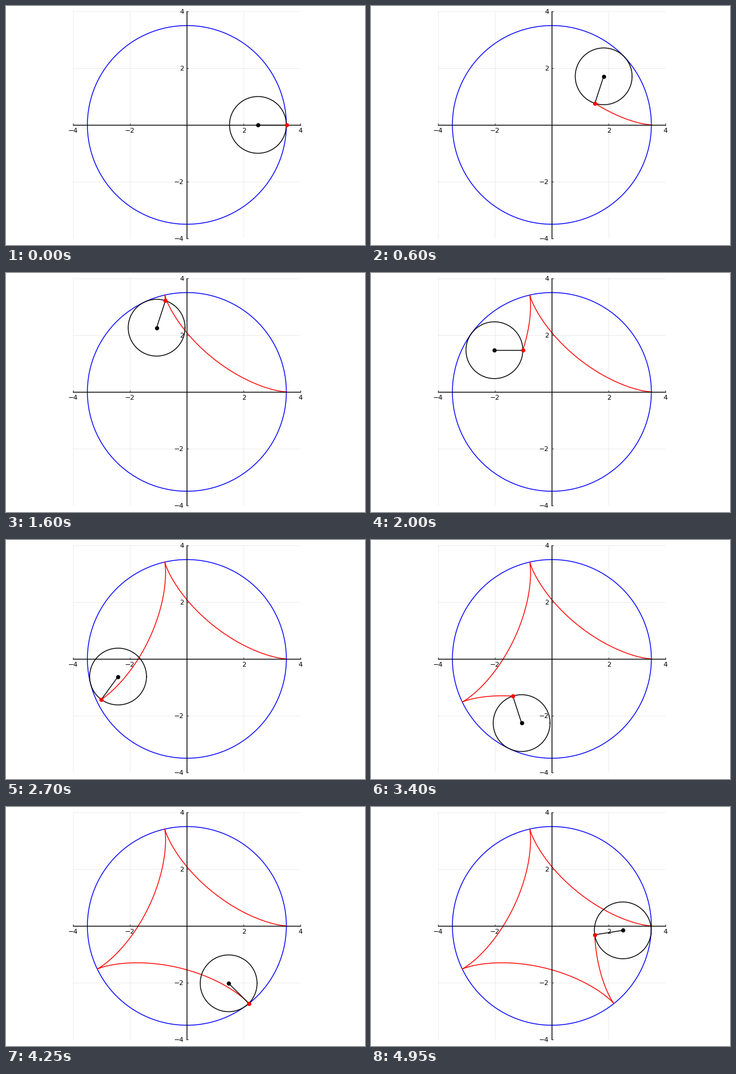
Write a matplotlib script that moves like this. It is 600 px wide and 400 px high and loops after 5 s.

```python
import numpy as np
import matplotlib.pyplot as plt
from matplotlib.animation import FuncAnimation

WIDTH, HEIGHT, DPI = 600, 400, 100
FRAMES, INTERVAL = 100, 50
BIG, SMALL = 3.5, 1.0          # radii of the fixed and the rolling circle
ARM = BIG - SMALL
LIMIT = 4
CENTER_X, CENTER_Y, SIDE = 302.3, 201, 380   # plot area in pixels


def circle(x, y, radius):
    a = np.linspace(0, 2 * np.pi, 200)
    return x + radius * np.cos(a), y + radius * np.sin(a)


def hub(t):
    return ARM * np.cos(t), ARM * np.sin(t)


def hypocycloid(t):
    x, y = hub(t)
    spin = ARM / SMALL * t
    return x + SMALL * np.cos(spin), y - SMALL * np.sin(spin)


fig = plt.figure(figsize=(WIDTH / DPI, HEIGHT / DPI), dpi=DPI, facecolor="white")
ax = fig.add_axes([(CENTER_X - SIDE / 2) / WIDTH, (CENTER_Y - SIDE / 2) / HEIGHT,
                   SIDE / WIDTH, SIDE / HEIGHT])
ax.set(xlim=(-LIMIT, LIMIT), ylim=(-LIMIT, LIMIT))
ticks = [-4, -2, 2, 4]
ax.set_xticks(ticks)
ax.set_yticks(ticks)
ax.tick_params(direction="in", length=2.5, width=0.5, labelsize=8,
               labelfontfamily="DejaVu Sans")
ax.set_axisbelow(True)
ax.grid(color="black", alpha=0.1, linewidth=0.5)
for side in ("left", "bottom"):
    ax.spines[side].set_position("zero")
    ax.spines[side].set_linewidth(1)
for side in ("right", "top"):
    ax.spines[side].set_visible(False)


def line(color, zorder):
    return ax.plot([], [], color=color, linewidth=1, zorder=zorder)[0]


def dot(color, zorder):
    return ax.scatter([0], [0], s=16, color=color, linewidths=1, zorder=zorder)


ax.plot(*circle(0, 0, BIG), color="blue", linewidth=1, zorder=1)
trace = line("red", 2)
wheel = line("black", 3)
spoke = line("black", 4)
hub_dot = dot("black", 5)
pen_dot = dot("red", 6)


def draw(i):
    t = 2 * np.pi * i / FRAMES
    center, pen = hub(t), hypocycloid(t)
    if i:
        trace.set_data(*hypocycloid(np.linspace(0, t, 10 * i + 1)))
    else:
        trace.set_data([], [])
    wheel.set_data(*circle(*center, SMALL))
    spoke.set_data(*zip(center, pen))
    hub_dot.set_offsets([center])
    pen_dot.set_offsets([pen])
    return trace, wheel, spoke, hub_dot, pen_dot


anim = FuncAnimation(fig, draw, frames=FRAMES, interval=INTERVAL,
                     repeat=True, repeat_delay=0)
plt.show()
```
